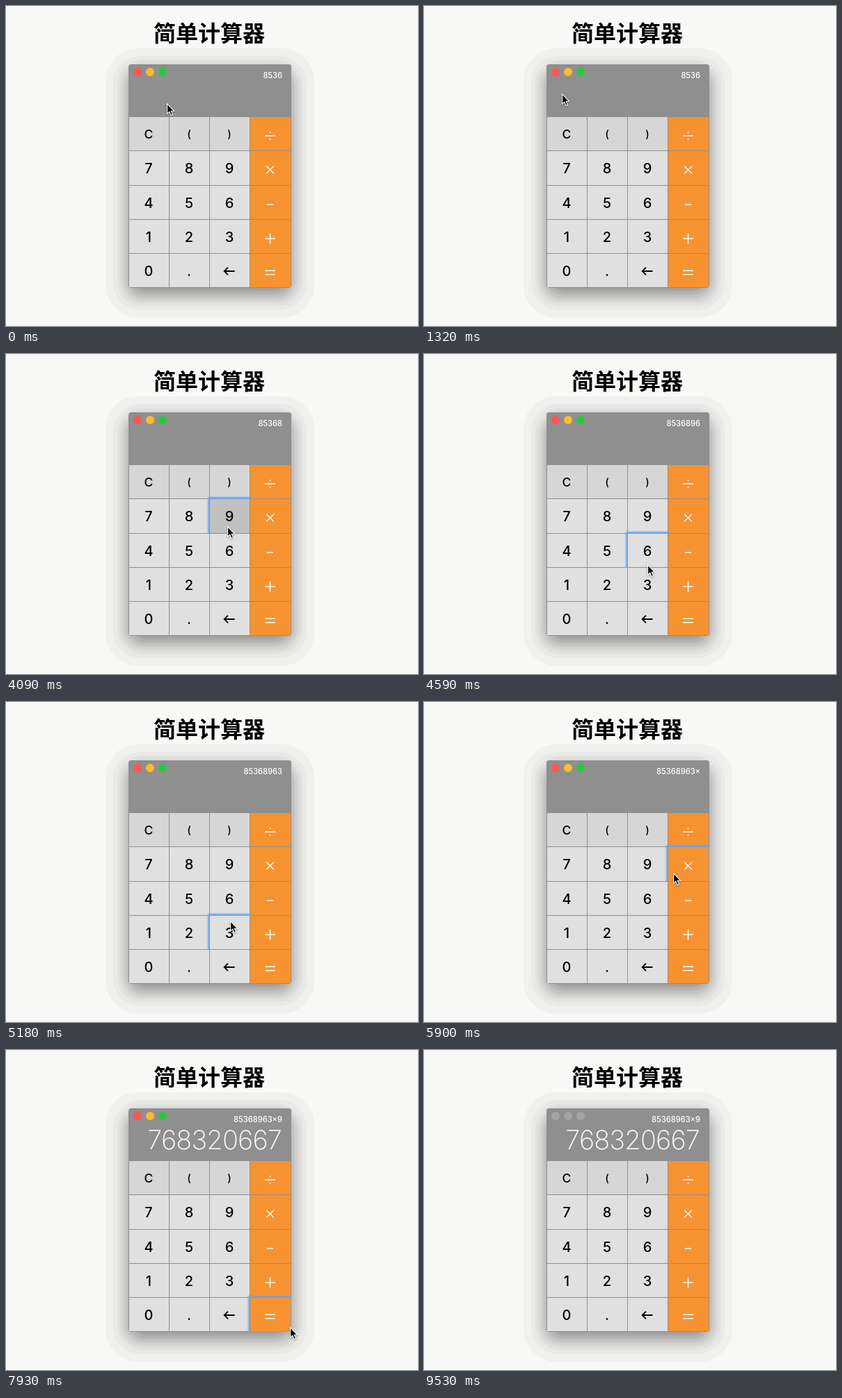
Recreate the animation shown at these times as an HTML page. Size 592 by 461 pixels, loop 9630 ms.

```html
<!DOCTYPE html>
<html lang="zh">
<head>
<meta charset="utf-8">
<title>简单计算器</title>
<style>
  html, body { margin: 0; width: 100%; height: 100%; overflow: hidden; background: #f8f8f6; }
  #stage { position: relative; width: 592px; height: 461px; overflow: hidden;
    background: #f8f8f6; font-family: Inter, Roboto, sans-serif; font-optical-sizing: none; cursor: default; }
  #stage div, #stage svg { position: absolute; box-sizing: border-box; }
  #title { left: 0; top: 17px; width: 584px; text-align: center; color: #000;
    font: 700 32px/40px "Noto Sans CJK SC", "Noto Sans CJK", sans-serif; }
  #calc { left: 176px; top: 84px; width: 234px; height: 322px; border-radius: 4px;
    overflow: hidden; background: #8f8f8f; }
  #entry, #result { right: 13px; color: #fff; white-space: nowrap; }
  #entry { top: 8px; font-size: 11.1px; line-height: 16px; font-weight: 500; }
  #result { top: 25px; right: 14px; font-size: 38px; line-height: 40px; font-weight: 150; letter-spacing: -.8px; }
  .light { border-radius: 50%; }
  .light svg { left: 0; top: 0; stroke: #0009; stroke-width: 1.2; fill: none; }
  .key { display: flex; align-items: center; justify-content: center; padding: 1px 2px 0 0;
    border: solid #8f8f8f; border-width: 1px 0 0 1px;
    background: #e0e0e0; color: #000; font-size: 20px; font-weight: 450; }
  .key.top { background: #d6d6d6; font-size: 17.5px; font-weight: 500; }
  .key.paren { font-size: 15px; }
  .key.op { background: #f79231; }
  .key.down { background: #c0c0c0; }
  .key.op.down { background: #c87729; }
  .key.focus { border-color: #6d9fd8; box-shadow: 0 0 2px 2px #6ba7ee; }
  .key svg { left: 0; top: 0; width: 100%; height: 100%; fill: none; stroke: #fff; stroke-width: 1.5; }
  .key svg.arrow { stroke: #000; stroke-width: 1.9; }
  #cursor { left: 0; top: 0; overflow: visible; filter: drop-shadow(0 1px 1px #0006); }
</style>
</head>
<body>
<div id="stage">
  <div id="title">简单计算器</div>
  <div id="calc">
    <div id="entry"></div>
    <div id="result"></div>
  </div>
  <svg id="cursor" width="12" height="19">
    <path d="M.6 .9V15.2L3.8 12.2L6.1 17.6L8.5 16.6L6.2 11.3H10.6Z" fill="#000" stroke="#fff" stroke-width="1.1"/>
  </svg>
</div>
<script>
const LOOP = 9630;
const [stage, calc, entry, result, cursor] =
  ['stage', 'calc', 'entry', 'result', 'cursor'].map(id => document.getElementById(id));

function addDiv(parent, cls, x, y, w, h) {
  const el = document.createElement('div');
  el.className = cls;
  Object.assign(el.style, { left: x + 'px', top: y + 'px', width: w + 'px', height: h + 'px' });
  parent.append(el);
  return el;
}

// Stepped soft shadow: contours of a blur at even darkness steps
const LEVELS = 16;
for (let i = 0; i < 12; i++) {
  const spread = 19 * Math.atanh(1 - (2 * i + 1) / LEVELS);
  const shade = Math.round(248 * (1 - (i + 1) / LEVELS / 2));
  const band = addDiv(stage, '', 176 - spread, 94 - spread, 234 + 2 * spread, 322 + 2 * spread);
  band.style.borderRadius = 24 + 0.7 * spread + 'px';
  band.style.background = `rgb(${shade},${shade},${shade - 1})`;
  stage.insertBefore(band, calc);
}

// Window lights
const lights = [
  ['#fc5750', 'M3.8 3.8L8.2 8.2M8.2 3.8L3.8 8.2'],
  ['#fdbc2c', 'M3 6H9'],
  ['#29c73f', 'M3 6H9M6 3V9']
].map(([color, icon], i) => {
  const el = addDiv(calc, 'light', 7 + 18 * i, 5, 12, 12);
  el.innerHTML = `<svg width="12" height="12"><path d="${icon}"/></svg>`;
  return { el, color, icon: el.firstChild };
});

// Keys; each owns its left and top rule
const signs = {
  '÷': 'M-7.5 0H7.5M0 -6V-4M0 4V6',
  '×': 'M-5.5 -5.5L5.5 5.5M5.5 -5.5L-5.5 5.5',
  '-': 'M-4.7 0H4.7',
  '+': 'M-7.5 0H7.5M0 -7.5V7.5',
  '=': 'M-7.3 -2.7H7.3M-7.3 2.7H7.3',
  '←': 'M7.5 0H-7M-2 -5.3L-7.3 0L-2 5.3'
};
const rowTop = r => Math.round(75 + 49.25 * r);
const keys = {};
['C()÷', '789×', '456-', '123+', '0.←='].forEach((row, r) => {
  [...row].forEach((ch, c) => {
    const key = addDiv(calc, 'key', 58 * c, rowTop(r), 59, rowTop(r + 1) - rowTop(r));
    if (c === 3) key.classList.add('op');
    else if (r === 0) key.classList.add('top');
    if ('()'.includes(ch)) key.classList.add('paren');
    if (signs[ch]) {
      const arrow = ch === '←';
      const place = arrow ? '28 25' : '28.5 27';
      key.innerHTML = `<svg class="${arrow ? 'arrow' : ''}" role="img" aria-label="${ch}">` +
        `<path transform="translate(${place})" d="${signs[ch]}"/></svg>`;
    } else {
      key.textContent = ch;
    }
    keys[ch] = key;
  });
});

// The session: pointer moves and key clicks
const STEP = 57, HOLD = 100, BLUR = 9530;
const start = { x: 231, y: 140 };
const moves = [], clicks = [];
const go = (at, x, y, time = 170) => moves.push({ at, x, y, time });
function click(ch, at, press, x, y) {
  go(at, x, y);
  clicks.push({ ch, press, release: press + HOLD });
}

go(120, 116, 128, 450);
go(610, 162, 127, 420);
go(1150, 198, 126);
go(1560, 189, 100, 110);
go(1970, 206, 96, 240);
go(2560, 207, 111, 290);
go(2910, 246, 147, 60);
click('8', 3140, 3510, 262, 240);
click('9', 3790, 4090, 318, 248);
click('6', 4260, 4490, 321, 303);
click('3', 4770, 5080, 322, 315);
click('×', 5230, 5640, 372, 245);
click('9', 5850, 6080, 316, 247);
click('=', 6360, 6830, 368, 389);
go(7490, 377, 387, 80);
go(7930, 500, 435);
go(8370, 520, 466, 120);

// The pointer advances in even hops, as on a coarse screen recording
function pointerAt(t) {
  let { x, y } = start;
  for (const m of moves) {
    if (t < m.at) break;
    const hops = Math.round(m.time / STEP);
    const p = Math.min(1, (Math.floor((t - m.at) / m.time * hops) + 1) / (hops + 1));
    x += (m.x - x) * p;
    y += (m.y - y) * p;
  }
  return [Math.round(x), Math.round(y)];
}

function render(t) {
  const [x, y] = pointerAt(t);
  cursor.style.transform = `translate(${x}px, ${y}px)`;

  const inside = x >= 176 && x < 410 && y >= 84 && y < 406;
  const onLights = x >= 183 && x <= 231 && y >= 89 && y < 99;
  for (const { el, color, icon } of lights) {
    el.style.background = inside ? color : '#a4a4a4';
    icon.style.display = onLights ? '' : 'none';
  }

  const pressed = clicks.filter(c => t >= c.press);
  const typed = pressed.filter(c => t >= c.release).map(c => c.ch).join('');
  const last = pressed[pressed.length - 1];
  entry.textContent = '8536' + typed.replace('=', '');
  result.textContent = typed.endsWith('=') ? 85368963 * 9 : '';
  for (const ch in keys) {
    const current = last && last.ch === ch;
    keys[ch].classList.toggle('focus', !!current && t < BLUR);
    keys[ch].classList.toggle('down', !!current && t < last.release);
  }
}

const begin = performance.now();
function tick() {
  render((performance.now() - begin) % LOOP);
  requestAnimationFrame(tick);
}
render(0);
requestAnimationFrame(tick);
</script>
</body>
</html>
```
